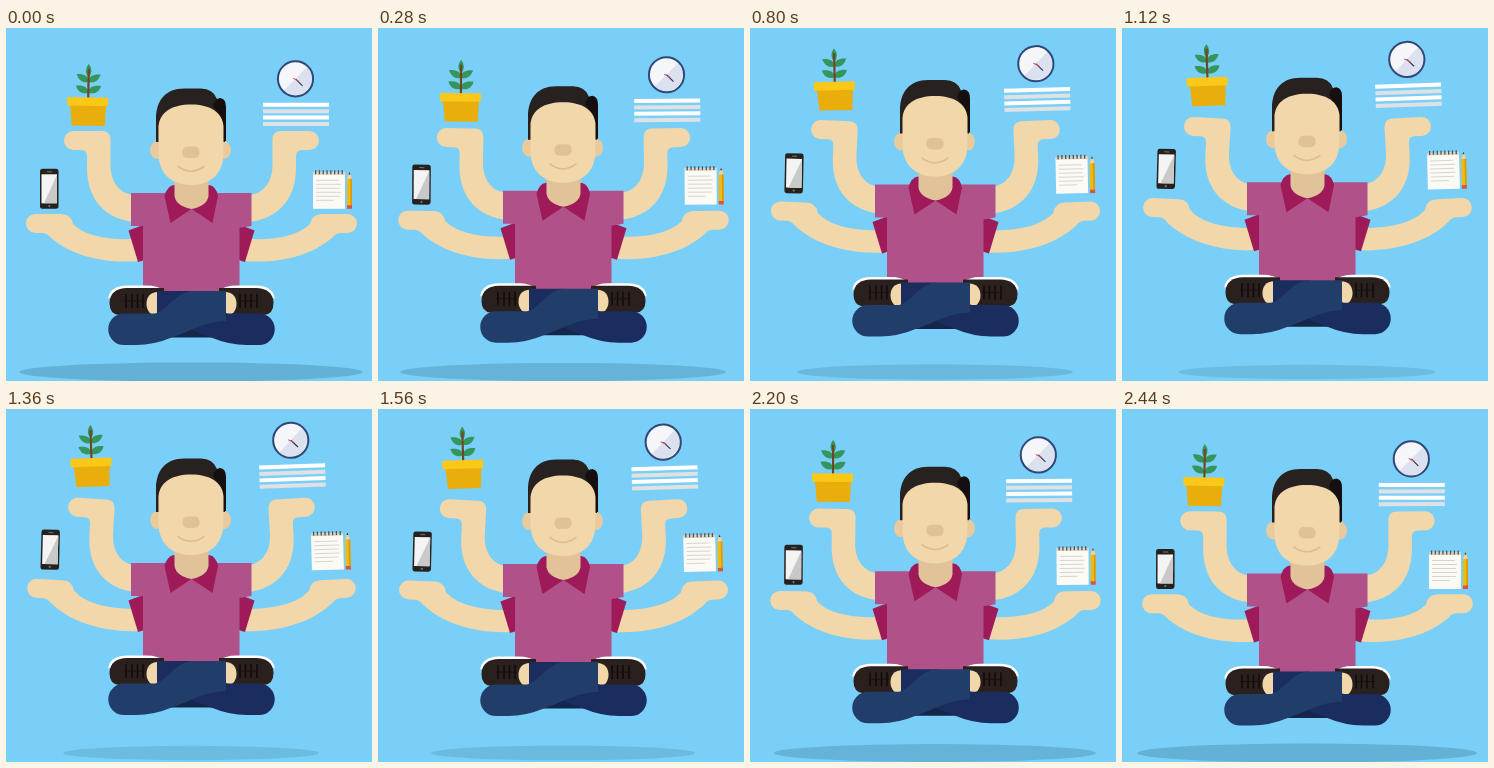
An HTML page that plays this animation: 366x353 px, repeating every 2.52 s.

```html
<!DOCTYPE html>
<html lang="en">
<head>
<meta charset="utf-8">
<title>Floating multitasker</title>
<style>
  html, body { margin: 0; width: 100%; height: 100%; overflow: hidden; background: #79cff7; }
  svg { display: block; width: 100vw; height: 100vh; }
</style>
</head>
<body>
<svg viewBox="0 0 366 353" preserveAspectRatio="none">
  <defs>
    <g id="upper">
      <path fill="#f2d7aa" d="M67.5 103H96Q104 103 104.5 111V138C105 154 113 165 127 167L130 194C100 192 81 172 81 140V128Q81 122 75 122H67.5A9.5 9.5 0 0 1 67.5 103Z"/>
    </g>
    <g id="lower">
      <path fill="#f2d7aa" d="M29.5 186H55Q65 186 67 196C78 207 98 212 127 211H142V232L133 233C97 236 64 227 44 209Q41 205 36 205H29.5A9.5 9.5 0 0 1 29.5 186Z"/>
    </g>
    <path id="cuff" fill="#9e1a59" d="M122.5 202.500L137 197H142V231L132 234Z"/>
    <g id="shoe">
      <path fill="#fff" d="M102 273C102 262 110 257.500 121 257.500H140Q153 257.500 158 263V270H102Z"/>
      <path fill="#2a211e" d="M103.500 275C103.500 265 111 260 121 260H158V287H113Q103.500 286 103.500 275Z"/>
      <path stroke="#0f0b0a" stroke-width="1.500" fill="none" d="M120 266V280M126 266V280M131.500 266V280M137 266V280"/>
      <path stroke="#17110f" stroke-width="1" d="M118 273H139"/>
      <path fill="#f2d7aa" d="M152 264C144 264 140.500 269 140.500 276S145 288 152 288Z"/>
    </g>
    <path id="leg" d="M118 285.500H149C162 282 168 266 185 263H220V293C200 293 185 303 167 309Q148 317 130 317H118A15.750 15.750 0 0 1 118 285.500Z"/>
    <g id="leaf">
      <path fill="#35955a" d="M82 53C77 55 72 52 70 45.500C77 45 82 47 82 53ZM82 64C76 66 71 63 69.500 57C77 56 82 58.500 82 64Z"/>
    </g>
  </defs>

  <rect width="366" height="353" fill="#79cff7"/>
  <ellipse id="shadow" cx="185" cy="344" fill="#0a3040"/>

  <g id="body">
    <g id="armUL"><use href="#upper"/></g>
    <g id="armUR"><use href="#upper" transform="matrix(-1 0 0 1 371 0)"/></g>
    <g id="armLL"><use href="#lower"/></g>
    <g id="armLR"><use href="#lower" transform="matrix(-1 0 0 1 371 0)"/></g>
    <use href="#cuff"/>
    <use href="#cuff" transform="matrix(-1 0 0 1 371 0)"/>

    <path fill="#b0518a" d="M125 165H245.500V198L233.500 200V265H137V198H125Z"/>
    <path fill="#9e1a59" d="M168 157Q161 158 158.500 168L164.500 195L185.500 181L206.500 195L212 168Q210 158 203 157Z"/>
    <path fill="#e1c299" d="M168.500 145H202.500V168Q201 178 185.500 181Q170 178 168.500 168Z"/>

    <ellipse cx="151" cy="122" rx="7" ry="9" fill="#e8ca9c"/>
    <ellipse cx="218" cy="122" rx="7" ry="9" fill="#e8ca9c"/>
    <path fill="#272220" d="M150 114V91C150 72 160 60.500 178 60.500H195Q207 60.500 211 71L219 85V114H150Z"/>
    <path fill="#15100f" d="M207 78Q209 70 214.500 70Q220 71 220 79V113H216V92Z"/>
    <path fill="#f2d7aa" d="M152.500 115V98C154 84 166 76.500 185 76.500S216 84 217.500 98V125C217.500 147 203 157 185 157S152.500 147 152.500 125Z"/>
    <rect x="176.500" y="118.500" width="17" height="11.500" rx="5" fill="#dfc296"/>
    <path d="M171.500 138Q185 148.500 198.500 138" fill="none" stroke="#dcbd8f" stroke-width="1.600"/>

    <use href="#shoe"/>
    <use href="#shoe" transform="matrix(-1 0 0 1 371 0)"/>
    <path fill="#14264a" d="M160 290H210V309.500H160Z"/>
    <use href="#leg" fill="#1b2c5e" transform="matrix(-1 0 0 1 371 0)"/>
    <use href="#leg" fill="#213e6b"/>
  </g>

  <g transform="translate(0 0.8)">
    <g id="plant">
      <use href="#leaf"/>
      <use href="#leaf" transform="matrix(-1 0 0 1 164 0)"/>
      <path fill="#35955a" d="M82 35Q87.500 42 82 49Q76.500 42 82 35Z"/>
      <path stroke="#704523" stroke-width="2.200" d="M82 40V70"/>
      <path fill="#e9ae0b" d="M64 76H100L99 97H66Z"/>
      <rect x="61" y="68.500" width="41" height="8.500" rx="1" fill="#fac818"/>
    </g>

    <g id="clock">
      <circle cx="289.500" cy="50" r="17.500" fill="#f4f6fa"/>
      <path fill="#dbe1ee" d="M301.500 38A17 17 0 0 1 277.500 62Z"/>
      <circle cx="289.500" cy="50" r="17.600" fill="none" stroke="#304878" stroke-width="2"/>
      <path stroke="#2b3350" stroke-width="1.100" d="M289.500 50L296.500 57"/>
      <path stroke="#d0545a" stroke-width="1" d="M287 49.500L293 52.500"/>
    </g>

    <g id="papers">
      <path stroke="#fff" stroke-width="4" d="M257 76H323M257 88.800H323"/>
      <path stroke="#dfe1e3" stroke-width="4" d="M257 82.400H323M257 95.200H323"/>
    </g>

    <g id="phone">
      <rect x="34" y="140" width="18.500" height="40" rx="2.500" fill="#25211f"/>
      <rect x="35.500" y="145.500" width="15.500" height="29" fill="#f4f4f4"/>
      <path fill="#c9c9ca" d="M51 146V174.500H38Z"/>
      <path stroke="#777" d="M41 143H46"/>
      <circle cx="43.300" cy="177.300" r="1.100" fill="#777"/>
    </g>

    <g id="pad">
      <rect x="307" y="143.500" width="32" height="36.500" fill="#fbfaf5"/>
      <path fill="#ddd3c0" d="M307 143.500H339V146H307Z"/>
      <path stroke="#d6d5d0" stroke-width="1" d="M310 151.500H333M310 155.500H335M310 159.500H334M310 163.500H335M310 167.500H334M310 171.500H328"/>
      <path stroke="#5a5048" stroke-width="4" stroke-dasharray="1.300 2.500" d="M309 143.500H338"/>
    </g>

    <g id="pencil">
      <path fill="#f1ba13" d="M341 150H346V177H341Z"/>
      <path fill="#f0d3a0" d="M341 150L343.500 143L346 150Z"/>
      <path fill="#3b3028" d="M342.600 145.600L343.500 143L344.400 145.600Z"/>
      <path fill="#d99a0a" d="M344.300 150H346V177H344.300Z"/>
      <path fill="#d9504c" d="M341 176.500H346V180H341Z"/>
    </g>
  </g>
</svg>
<script>
const LOOP = 2520, STEP = 40, PEAK = 1260, SWING = 2900;
const el = id => document.getElementById(id);
const set = (id, value) => el(id).setAttribute('transform', value);

// arm: pivot x, pivot y, degrees at the top of the rise
const arms = {
  armUL: [125, 180, 3.4], armUR: [246, 180, -3.4],
  armLL: [130, 215, 3], armLR: [241, 215, -3]
};
// prop: centre x, centre y, shift x, shift y, start angle, end angle
const props = {
  plant: [82, 83, 4, -20.4, 1, -2],
  clock: [289.5, 50, -4.8, -19.8, 0, -2],
  papers: [290, 86, -3.6, -19.6, 0, -2],
  phone: [43, 160, 1, -20.4, 0, 1.5],
  pad: [323, 161, -1.6, -20.2, 0, -1.5],
  pencil: [343.5, 162, -1.6, -20.6, 0, -1.5]
};

function rise(t) {
  const swing = d => 1 - Math.cos(2 * Math.PI * d / SWING);
  return 1 - swing(t - PEAK) / swing(PEAK);
}

function draw(t) {
  const k = rise(Math.min(Math.floor(t / STEP) * STEP, LOOP - 2 * STEP));
  const size = 1 - 0.26 * k;
  el('shadow').setAttribute('rx', 172 * size);
  el('shadow').setAttribute('ry', 9.6 * size);
  el('shadow').setAttribute('opacity', 0.19 - 0.07 * k);
  set('body', `translate(0 ${-11.1 * k})`);
  for (const [id, [x, y, turn]] of Object.entries(arms))
    set(id, `rotate(${turn * k} ${x} ${y})`);
  for (const [id, [x, y, dx, dy, a, b]] of Object.entries(props))
    set(id, `translate(${dx * k} ${dy * k}) rotate(${a + (b - a) * k} ${x} ${y})`);
}

const start = performance.now();
function tick(now) {
  draw(Math.max(0, now - start) % LOOP);
  requestAnimationFrame(tick);
}
draw(0);
requestAnimationFrame(tick);
</script>
</body>
</html>
```
